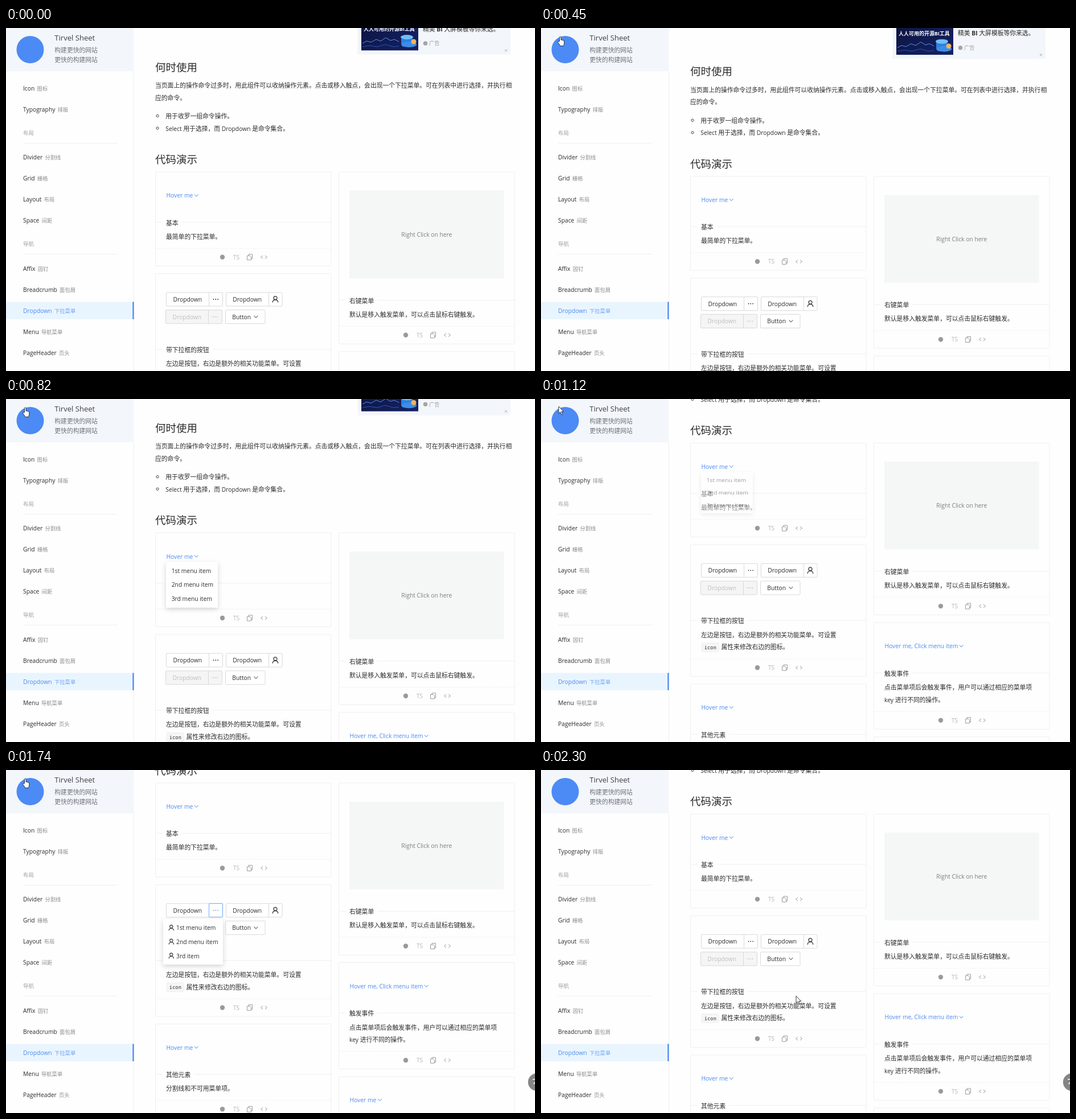
These frames come from a looping animation (929x603 px, 2350 ms). An HTML page:

```html
<!DOCTYPE html>
<html lang="zh-CN">
<head>
<meta charset="utf-8">
<title>Dropdown</title>
<style>
html, body { margin: 0; width: 100%; height: 100%; overflow: hidden; background: #fefefe; }
svg { display: block; width: 100%; height: 100%; }
text { font-family: "Open Sans", "Noto Sans CJK SC", "Noto Sans CJK", sans-serif; white-space: pre; }
.mono { font-family: "DejaVu Sans Mono", monospace; }
</style>
</head>
<body>
<svg id="stage" viewBox="0 0 929 603" xmlns="http://www.w3.org/2000/svg"></svg>
<script>
const LOOP = 2350;
const INK = '#2b2b2b', LINK = '#4c8af2', GREY = '#8c8c8c', RULE = '#efefef', EDGE = '#d9d9d9';

// ---- drawing helpers, all return SVG markup ----
const rect = (x, y, w, h, fill, more = '') =>
  `<rect x="${x}" y="${y}" width="${w}" height="${h}" fill="${fill}" ${more}/>`;
const line = (x1, x2, y, more = '') =>
  `<path d="M${x1} ${y}H${x2}" stroke="${RULE}" ${more}/>`;
const stroke = (d, color, width = 1, more = '') =>
  `<path d="${d}" fill="none" stroke="${color}" stroke-width="${width}" ${more}/>`;
const dot = (x, y, r, fill, more = '') =>
  `<circle cx="${x}" cy="${y}" r="${r}" fill="${fill}" ${more}/>`;

// Latin runs are set slightly smaller than the Chinese ones
const runs = (s, size) =>
  s.replace(/[^\x00-\xff]+/g, m => `<tspan font-size="${size}">${m}</tspan>`);

// cy is the optical middle of the line
const text = (x, cy, s, fill = INK, size = 10.8, more = '') =>
  `<text x="${x}" y="${(cy + size * 0.37).toFixed(2)}" fill="${fill}" font-size="${(size * 0.954).toFixed(2)}" ${more}>${runs(s, size)}</text>`;

const chevron = (x, cy, color) => stroke(`M${x} ${cy - 2}l3.3 3.7 3.3-3.7`, color);
const ellipsis = (cx, cy, color) =>
  [-3.8, 0, 3.8].map(d => dot(cx + d, cy, 0.9, color)).join('');
const user = (cx, cy, k = 1) =>
  `<g transform="translate(${cx} ${cy}) scale(${k})">` +
  stroke('M-4.8 5.6C-4.6-.6 4.6-.6 4.8 5.6', INK, 1.2) +
  dot(0, -2.4, 3, 'none', `stroke="${INK}" stroke-width="1.2"`) + '</g>';

const link = (x, cy, s, arrowX) => text(x, cy, s, LINK) + chevron(arrowX, cy, LINK);

function actions(x, cy) {
  const c = '#9a9a9a';
  return dot(x + 117.5, cy, 4.2, c) +
    text(x + 136.5, cy, 'TS', '#b5b5b5', 10.5) +
    stroke(`M${x + 161} ${cy - 2.5}h5l2 2v5.5h-7zM${x + 163.5} ${cy - 2.5}v-2.5h6.5v8h-2`, c, 1) +
    stroke(`M${x + 188.5} ${cy - 2.8}l-3.5 2.8 3.5 2.8M${x + 192.5} ${cy - 2.8}l3.5 2.8-3.5 2.8`, c, 1);
}

// a demo card: empty body, title set into a rule, description, action row
function card(x, y, body, title, lines) {
  const rule = y + body, last = rule + 25.3 + (lines.length - 1) * 21.7;
  const titleEnd = x + 18.5 + title.length * 10.8 + 6;
  return rect(x, y, 308.5, last + 51.5 - y, '#fefefe', `stroke="${RULE}" rx="1.5"`) +
    line(x, x + 12.5, rule) + line(titleEnd, x + 308.5, rule) +
    text(x + 18.5, rule + 1.2, title) +
    lines.map((s, i) => s && text(x + 18.5, rule + 25.3 + i * 21.7, s)).join('') +
    line(x, x + 308.5, last + 20.5, 'stroke-dasharray="2 1"') +
    actions(x, last + 36);
}

const button = (x, y, w, fill = '#fff') =>
  rect(x, y, w, 24, fill, `stroke="${EDGE}" rx="1.5"`);

function menu(id, x, y, w, body) {
  return `<g id="${id}"><g transform="translate(${x} ${y})">` +
    rect(0, 0, w, 80, '#fff', 'rx="1.5" filter="url(#shadow)"') + body + '</g></g>';
}

// ---- page parts ----
function advert() {
  return rect(617, -50, 269, 96.5, '#f3f6fa', 'rx="2"') +
    rect(624, -38, 100, 77.4, 'url(#night)') +
    stroke('M626 27l7-4 8 2 9-5 8 3 9-6 8 5 7-2 8 4', '#5a8fe8', 1) +
    stroke('M626 33l12-2 14 2 14-4 14 4 10-1', '#2c55b8', 1) +
    rect(694, 15, 20, 18, '#2f7fe0', 'rx="5"') +
    `<ellipse cx="704" cy="16" rx="11" ry="4" fill="#6fc0f5"/>` +
    `<ellipse cx="708" cy="29" rx="13" ry="5" fill="#3d8de8"/>` +
    dot(716, 24, 4.5, '#f0b45c') +
    text(628, 2, '人人可用的开源BI工具', '#fff', 9, 'font-weight="700"') +
    text(732, 1.5, '精美 <tspan font-weight="700">BI</tspan> 大屏模板等你来选。') +
    dot(736.5, 27, 3.8, '#a5a5a5') + text(743, 27, '广告', '#a0a0a0', 9.3) +
    stroke('M876 37.5l4 4m0-4l-4 4', '#9a9a9a', 0.8);
}

function intro() {
  return text(262, 68.7, '何时使用', INK, 18.5) +
    text(262, 101, '当页面上的操作命令过多时，用此组件可以收纳操作元素。点击或移入触点，会出现一个下拉菜单。可在列表中进行选择，并执行相') +
    text(262, 122.7, '应的命令。') +
    ['用于收罗一组命令操作。', 'Select 用于选择，而 Dropdown 是命令集合。'].map((s, i) =>
      dot(266, 154.5 + i * 21.6, 2.1, 'none', `stroke="${INK}" stroke-width="0.9"`) +
      text(280.3, 155 + i * 21.6, s)).join('') +
    text(262, 231, '代码演示', INK, 18.5);
}

function buttons() {
  const pale = '#bfbfbf';
  return button(281.5, 465, 99) + stroke('M356.5 465v24', EDGE) +
    text(293.5, 477, 'Dropdown') +
    `<g id="more">${rect(356.5, 465, 24, 24, 'none', 'id="moreBox" rx="1"')}${ellipsis(368.3, 477, 'currentColor')}</g>` +
    button(386.5, 465, 98.5) + stroke('M461.5 465v24', EDGE) +
    text(398.3, 477, 'Dropdown') + user(473, 477) +
    button(280.5, 495.7, 99, '#f5f5f5') + stroke('M355.5 495.7v24', EDGE) +
    text(292.5, 507.7, 'Dropdown', pale) + ellipsis(367.3, 507.7, pale) +
    button(385.5, 495.7, 69.5) + text(397.3, 507.7, 'Button') + chevron(435.6, 507.7, INK);
}

function cards() {
  const L = 262.5, R = 584.5;
  return card(L, 253, 88.5, '基本', ['最简单的下拉菜单。']) +
    link(281.5, 294.4, 'Hover me', 331) +
    card(L, 431.7, 133.3, '带下拉框的按钮', ['左边是按钮，右边是额外的相关功能菜单。可设置', '']) +
    buttons() +
    rect(282, 604.5, 30.5, 15.5, '#f6f6f6', 'stroke="#ececec" stroke-width="0.8" rx="2"') +
    text(286.8, 612.2, 'icon', INK, 9.2, 'class="mono"') +
    text(316.5, 612, '属性来修改右边的图标。') +
    card(L, 676.7, 88.6, '其他元素', ['分割线和不可用菜单项。']) +
    link(281.5, 718, 'Hover me', 331) +
    card(R, 253, 225.5, '右键菜单', ['默认是移入触发菜单，可以点击鼠标右键触发。']) +
    rect(603, 286, 271.5, 154, '#f5f6f6') +
    text(738.8, 363, 'Right Click on here', '#7d7d7d', 10.8, 'text-anchor="middle"') +
    card(R, 568.8, 88.8, '触发事件', ['点击菜单项后会触发事件，用户可以通过相应的菜单项', 'key 进行不同的操作。']) +
    link(603.5, 610.2, 'Hover me, Click menu item', 734.8) +
    card(R, 769.7, 88.8, '', ['']) +
    link(603.5, 810.4, 'Hover me', 653);
}

function menus() {
  const rows = [15.5, 40, 64.7];
  const plain = ['1st menu item', '2nd menu item', '3rd menu item'];
  const iconed = ['1st menu item', '2nd menu item', '3rd item'];
  return menu('menuA', 281, 304.2, 91, plain.map((s, i) => text(9.7, rows[i], s)).join('')) +
    menu('menuB', 276, 492.2, 105, iconed.map((s, i) =>
      user(14.3, rows[i], 0.88) + text(23, rows[i], s)).join(''));
}

function sidebar() {
  const items = [
    [106, 'Icon', '图标'], [143.3, 'Typography', '排版'], [184.5, '布局'],
    [227.3, 'Divider', '分割线'], [264.3, 'Grid', '栅格'], [301.3, 'Layout', '布局'],
    [338.3, 'Space', '间距'], [379.7, '导航'], [423, 'Affix', '固钉'],
    [460, 'Breadcrumb', '面包屑'], [497, 'Dropdown', '下拉菜单'],
    [534, 'Menu', '导航菜单'], [571, 'PageHeader', '页头']
  ];
  const row = ([y, name, sub]) => {
    if (!sub) return text(30, y, name, '#a0a0a0', 9.5) + line(30, 196, y + 17.9);
    const active = name === 'Dropdown';
    const label = `${name}<tspan dx="4.3" fill="${active ? '#6ea2f6' : GREY}">${runs(sub, 9.3)}</tspan>`;
    const band = active ? rect(0, 481.5, 224.5, 30.5, '#e9f5fe') + rect(222.3, 481.5, 2.3, 30.5, LINK) : '';
    return band + `<text x="30" y="${y + 4}" font-size="10.3" fill="${active ? LINK : INK}">${label}</text>`;
  };
  return rect(0, 0, 224.5, 603, '#fefefe') +
    stroke('M224.5 76V603', RULE) + rect(0, 0, 224.5, 76, '#f3f6fa') +
    dot(42.5, 38, 24, '#4c8af5') +
    text(85.3, 16.5, 'Tirvel Sheet', '#3c4148', 13.7) +
    text(85.3, 39, '构建更快的网站', '#70757c') +
    text(85.3, 56.3, '更快的构建网站', '#70757c') +
    items.map(row).join('');
}

const topButton = () => '<g id="top">' + dot(932.3, 548.8, 15.5, '#858585') +
  stroke('M925 543.7H940M926.5 552l5.8-5.8', '#fff', 1.6) + '</g>';

const cursors = () =>
  '<path id="arrow" d="M0 0V12.5L2.9 9.8 5 14.7 7 13.8 4.9 9.1H8.8Z" fill="#fff" stroke="#222" stroke-width="0.9"/>' +
  '<path id="hand" transform="translate(27.5 14)" d="M5 9.5V2.4Q5 1 6.2 1T7.5 2.4V7Q8.6 6.3 9.5 7.3 10.6 6.7 11.4 7.9 13 7.5 13.3 9V13Q12.9 15 12 17.5H6.3Q4.2 13.5 2 11 2 9.3 3.5 9.4Z" fill="#fff" stroke="#222" stroke-width="0.9"/>';

const stage = document.getElementById('stage');
stage.innerHTML = `<defs>
  <linearGradient id="night" x2="1" y2="1"><stop stop-color="#0b1238"/><stop offset="1" stop-color="#152265"/></linearGradient>
  <filter id="shadow" x="-30%" y="-30%" width="160%" height="170%"><feDropShadow dx="0" dy="3" stdDeviation="4.5" flood-opacity="0.17"/></filter>
  </defs>` + rect(0, 0, 929, 603, '#fefefe') +
  `<g id="page">${advert()}${intro()}${cards()}${menus()}</g>` +
  sidebar() + topButton() + cursors();

// ---- motion ----
const part = id => document.getElementById(id);
const [page, menuA, menuB, more, moreBox, topBtn, arrow, hand] =
  ['page', 'menuA', 'menuB', 'more', 'moreBox', 'top', 'arrow', 'hand'].map(part);

// linear value through [time, value] pairs
function track(keys, t) {
  const i = keys.findIndex(k => k[0] > t);
  if (i === 0) return keys[0][1];
  if (i < 0) return keys[keys.length - 1][1];
  const [a, va] = keys[i - 1], [b, vb] = keys[i];
  return va + (vb - va) * (t - a) / (b - a);
}

const scroll = [[0, 0], [100, 0], [250, 7.7], [600, 7.7], [700, -17.8], [940, -17.8],
  [1090, -175.7], [1739, -175.7], [1740, -230.3], [1960, -230.3], [2080, -175.7]];
const openA = [[710, 0], [780, 1], [1080, 1], [1119, 0.45], [1168, 0.45], [1220, 0]];
const openB = [[1480, 0], [1560, 1], [2150, 1], [2295, 0]];
const showTop = [[1170, 0], [1270, 1]];
const arrowX = [[2245, 372], [2295, 448]];
const arrowY = [[2245, 318], [2295, 397.3]];

function pose(group, y, p) {
  group.setAttribute('opacity', p);
  group.setAttribute('visibility', p > 0 ? 'visible' : 'hidden');
  const k = 0.82 + 0.18 * p;
  group.setAttribute('transform', `translate(0 ${y * (1 - k)}) scale(1 ${k})`);
}

const show = (el, on) => el.setAttribute('visibility', on ? 'visible' : 'hidden');
const between = (t, a, b) => t >= a && t < b;

function draw(t) {
  page.setAttribute('transform', `translate(0 ${track(scroll, t)})`);
  pose(menuA, 304.2, track(openA, t));
  pose(menuB, 492.2, track(openB, t));
  topBtn.setAttribute('opacity', track(showTop, t));

  const hover = between(t, 1380, 2150);
  more.setAttribute('color', hover ? '#5aa2f5' : INK);
  moreBox.setAttribute('stroke', hover ? '#69aef8' : 'none');

  const parked = between(t, 50, 250) || between(t, 1000, 1370);
  show(hand, between(t, 250, 1000) || between(t, 1370, 2100));
  show(arrow, parked || t >= 2100);
  const x = parked ? 31 : track(arrowX, t), y = parked ? 13 : track(arrowY, t);
  arrow.setAttribute('transform', `translate(${x} ${y})`);
}

const start = performance.now();
function tick() {
  draw((performance.now() - start) % LOOP);
  requestAnimationFrame(tick);
}
draw(0);
requestAnimationFrame(tick);
</script>
</body>
</html>
```
